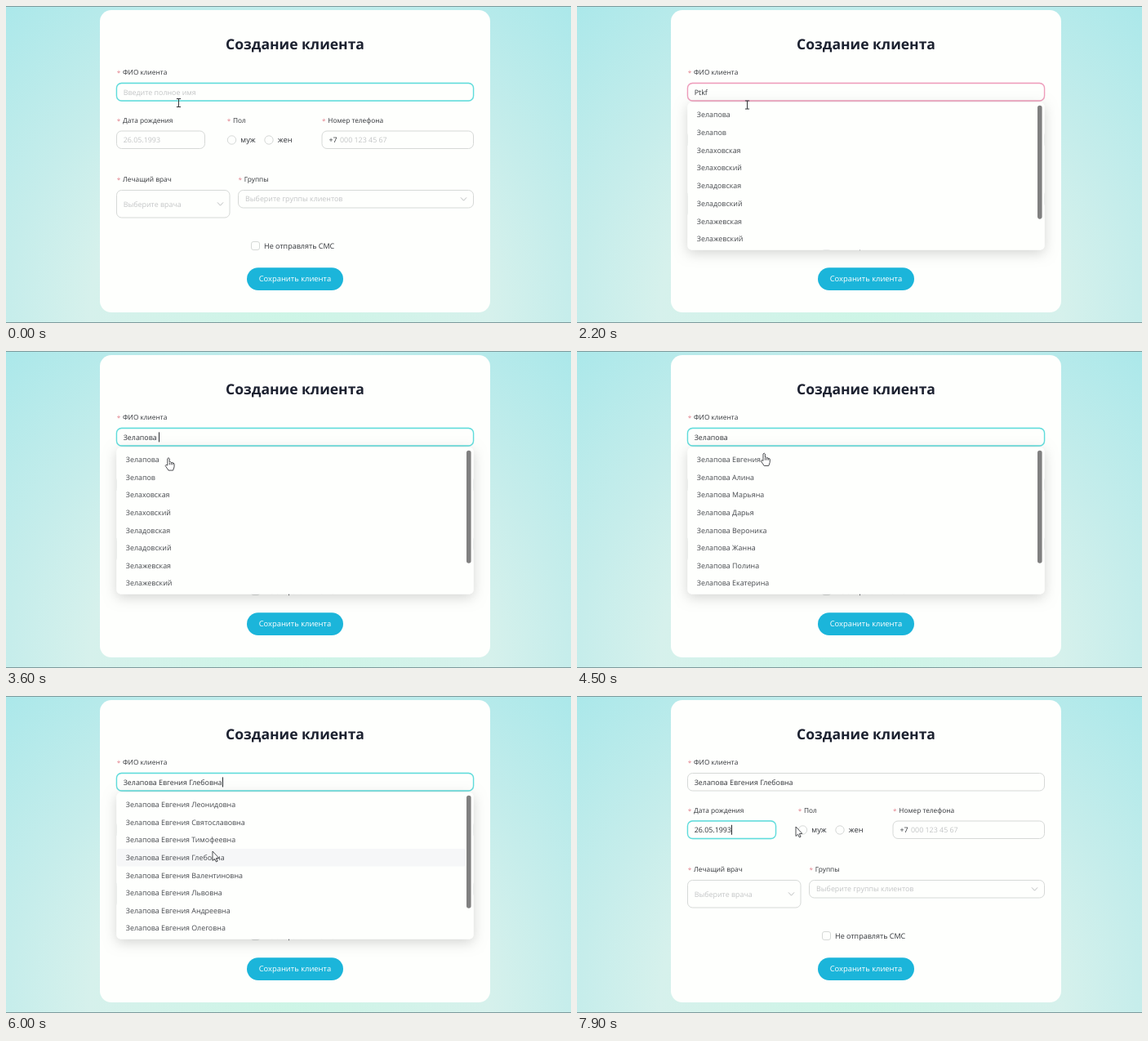
An HTML page with a canvas that plays this animation: 692 by 388 pixels, repeating every 8000 ms.

```html
<!DOCTYPE html>
<html lang="ru">
<head>
<meta charset="utf-8">
<title>Создание клиента</title>
<style>
html, body { margin: 0; width: 100%; height: 100%; overflow: hidden; }
canvas { display: block; width: 692px; height: 388px; }
</style>
</head>
<body>
<canvas id="stage" width="692" height="388"></canvas>
<script>
const ctx = document.getElementById('stage').getContext('2d');
const LOOP = 8000;
const FAMILY = '"Open Sans", "Noto Sans", sans-serif';
const INK = '#303338', HINT = '#c3c5c6', LINE = '#d6d9d7', CYAN = '#5fdcdb', PINK = '#ee9dbb';
const BODY = 8.9, LABEL = 8.3;

const SURNAME = 'Зелапова', FIRST = 'Евгения';
const firstNames = [FIRST, 'Алина', 'Марьяна', 'Дарья', 'Вероника', 'Жанна', 'Полина', 'Екатерина'];
const patronymics = ['Леонидовна', 'Святославовна', 'Тимофеевна', 'Глебовна',
  'Валентиновна', 'Львовна', 'Андреевна', 'Олеговна'];

// Each menu opens at `from` and starts closing at `to`.
const menus = [
  { from: 1850, to: 3600, items: [SURNAME, 'Зелапов', 'Зелаховская', 'Зелаховский',
    'Зеладовская', 'Зеладовский', 'Зелажевская', 'Зелажевский'] },
  { from: 4100, to: 4735, items: firstNames.map(n => `${SURNAME} ${n}`) },
  { from: 5200, to: 6050, hover: true, items: patronymics.map(p => `${SURNAME} ${FIRST} ${p}`) }
];

const typed = (text, start, step) =>
  [...text].map((_, i) => [start + i * step, text.slice(0, i + 1)]);

const nameEdits = [
  [300, ''],
  ...typed('Ptkf', 1300, 120),
  [3500, SURNAME + ' '],
  [4700, `${SURNAME} ${FIRST} `],
  [5900, `${SURNAME} ${FIRST} ${patronymics[3]}`]
];
const dateEdits = [[6600, ''], ...typed('26.05.1993', 7000, 75)];

// time, x, y, shape
const pointer = [
  [0, 211.5, 118.5, 'beam'], [1300, 211.5, 118.5, 'beam'], [1500, 208.5, 121, 'beam'],
  [2500, 208.5, 121, 'beam'], [3000, 199, 130.5, 'hand'], [4250, 199, 130.5, 'hand'],
  [4600, 236.5, 123.5, 'hand'], [5250, 236.5, 123.5, 'hand'], [5650, 253, 190, 'arrow'],
  [6150, 253, 190, 'arrow'], [6550, 214, 175, 'beam'], [7450, 214, 175, 'beam'],
  [7800, 268, 160, 'arrow'], [LOOP, 268, 160, 'arrow']
];

const clamp = v => Math.min(1, Math.max(0, v));
const smooth = v => v * v * (3 - 2 * v);
const latest = (list, t) => list.filter(e => e[0] <= t).pop() || list[0];

function text(str, x, midY, size = BODY, color = INK, align = 'left', weight = 400) {
  ctx.font = `${weight} ${size}px ${FAMILY}`;
  ctx.textAlign = align;
  ctx.fillStyle = color;
  ctx.fillText(str, x, midY + size * 0.355);
}

function box(x, y, w, h, r, fill, stroke, width = 1) {
  ctx.beginPath();
  ctx.roundRect(x, y, w, h, r);
  if (fill) { ctx.fillStyle = fill; ctx.fill(); }
  if (stroke) { ctx.strokeStyle = stroke; ctx.lineWidth = width; ctx.stroke(); }
}

function poly(points, close) {
  ctx.beginPath();
  points.forEach(([x, y]) => ctx.lineTo(x, y));
  if (close) ctx.closePath();
}

function label(str, x, y) {
  text('*', x, y + 0.8, LABEL, '#e2848f');
  text(str, x + 7.3, y, LABEL);
}

function field(x, y, w, h, accent) {
  if (accent) {
    ctx.globalAlpha = 0.28;
    box(x - 1, y - 1, w + 2, h + 2, 7, accent);
    ctx.globalAlpha = 1;
  }
  box(x, y, w, h, 6, '#fefffd', accent || LINE, accent ? 1.3 : 1);
}

function caret(x, midY, since, t) {
  if (Math.floor((t - since) / 530) % 2) return;
  ctx.fillStyle = '#26292e';
  ctx.fillRect(Math.round(x), midY - 6, 1, 12);
}

function edit(list, hint, x, midY, active, t) {
  const [since, value] = latest(list, t);
  text(value || hint, x, midY, BODY, value ? INK : HINT);
  if (active) caret(x + (value ? ctx.measureText(value).width : -0.4), midY, since, t);
}

function chevron(x, y) {
  poly([[x - 3.5, y - 1.8], [x, y + 2], [x + 3.5, y - 1.8]]);
  ctx.strokeStyle = '#bcbfbf';
  ctx.lineWidth = 1;
  ctx.stroke();
}

function radio(x, str) {
  ctx.beginPath();
  ctx.arc(x, 164, 5.2, 0, Math.PI * 2);
  ctx.strokeStyle = LINE;
  ctx.lineWidth = 1;
  ctx.stroke();
  text(str, x + 10.8, 164, 9.3);
}

function backdrop() {
  const g = ctx.createRadialGradient(346, 388, 0, 346, 388, 520);
  g.addColorStop(0, '#cdf5e6');
  g.addColorStop(0.47, '#d6f1ec');
  g.addColorStop(0.66, '#c6edeb');
  g.addColorStop(1, '#abe8ea');
  ctx.fillStyle = g;
  ctx.fillRect(0, 0, 692, 388);
  ctx.fillStyle = '#7d9a9c';
  ctx.fillRect(0, 0, 692, 1);
  ctx.fillRect(0, 387, 692, 1);
  box(115, 5, 478, 370, 14, '#fefffd');
}

function form(t) {
  const onDate = t >= 6600;
  const nameAccent = onDate ? null : t >= 1300 && t < 3500 ? PINK : CYAN;

  text('Создание клиента', 354, 47.2, 17.5, '#1c2130', 'center', 700);

  label('ФИО клиента', 135.7, 81.2);
  field(135.5, 94.5, 437, 21.5, nameAccent);
  edit(nameEdits, 'Введите полное имя', 143.7, 105.4, !onDate, t);

  label('Дата рождения', 135.7, 140);
  field(135.5, 153, 108, 21.5, onDate && CYAN);
  edit(dateEdits, '26.05.1993', 143.7, 163.8, onDate, t);

  label('Пол', 270.7, 140);
  radio(276.5, 'муж');
  radio(322, 'жен');

  label('Номер телефона', 387, 140);
  field(387, 153, 185.5, 21.5);
  text('+7', 395.5, 163.8);
  text('000 123 45 67', 409, 163.8, BODY, HINT);

  label('Лечащий врач', 135.7, 212);
  field(135.5, 225.5, 138.5, 33.5);
  text('Выберите врача', 143.7, 242.4, BODY, HINT);
  chevron(262.5, 242.2);

  label('Группы', 284.5, 212);
  field(284.5, 225.5, 288, 21.5);
  text('Выберите группы клиентов', 293, 236.2, BODY, HINT);
  chevron(560.5, 236.2);

  box(300.5, 288.5, 10, 10, 2.5, null, LINE);
  text('Не отправлять СМС', 316, 293.5, 9);

  box(295, 320.2, 118, 27.8, 13.9, '#1bb5da');
  text('Сохранить клиента', 353.9, 334, 9.4, '#fff', 'center');
}

// Shadow only outside the panel, so a fading panel stays clean.
function panelShadow(x, y, w, h) {
  ctx.save();
  ctx.beginPath();
  ctx.rect(x - 40, y - 40, w + 80, h + 80);
  ctx.roundRect(x, y, w, h, 5);
  ctx.clip('evenodd');
  ctx.shadowColor = 'rgba(0,0,0,0.17)';
  ctx.shadowBlur = 15;
  ctx.shadowOffsetY = 4;
  box(x, y, w, h, 5, '#fefffd');
  ctx.restore();
}

function menu(m, t, pos) {
  if (t < m.from || t > m.to + 200) return;
  const gone = t < m.to
    ? (1 - clamp((t - m.from) / 200)) ** 5
    : clamp((t - m.to) / 200) ** 5;
  const stretch = m === menus[0] && t < 3500 ? 1.006 : 1;

  ctx.save();
  ctx.globalAlpha = (1 - gone) ** 1.6;
  ctx.translate(0, 118);
  ctx.scale(1, (1 - 0.2 * gone) * stretch);

  panelShadow(135.5, 0, 437, 179.5);
  box(135.5, 0, 437, 179.5, 5, '#fefffd');

  if (m.hover) {
    const row = Math.round((pos.y - 132.8) / 21.64);
    if (row >= 0) box(136, 4 + row * 21.64, 427, 21.6, 2, '#f6f7f8');
  }
  m.items.forEach((item, i) => text(item, 146.8, 14.8 + i * 21.64, BODY, '#46494e'));
  box(564, 3.8, 5.6, 138, 2.8, '#808080');
  ctx.restore();
}

function pointerAt(t) {
  const i = pointer.findIndex(k => k[0] > t);
  const [t0, x0, y0, from] = pointer[i - 1], [t1, x1, y1, to] = pointer[i];
  const p = (t - t0) / (t1 - t0), e = smooth(p);
  return { x: x0 + (x1 - x0) * e, y: y0 + (y1 - y0) * e, shape: p < 0.6 ? from : to };
}

const shapes = {
  beam() {
    ctx.strokeStyle = '#34373a';
    ctx.lineWidth = 1;
    ctx.beginPath();
    for (const s of [-1, 1]) {
      ctx.moveTo(-2.6, 5 * s);
      ctx.lineTo(2.6, 5 * s);
    }
    ctx.moveTo(0, -5);
    ctx.lineTo(0, 5);
    ctx.stroke();
  },
  arrow() {
    poly([[0, 0], [0, 11.5], [2.6, 9.2], [4.4, 13], [6.1, 12.2], [4.4, 8.6], [7.8, 8.4]], true);
    paintCursor();
  },
  hand() {
    ctx.beginPath();
    ctx.moveTo(-1.2, 9.5);
    ctx.lineTo(-1.2, 1.2);
    ctx.quadraticCurveTo(0, -0.8, 1.2, 1.2);
    ctx.lineTo(1.2, 5.4);
    ctx.quadraticCurveTo(2.6, 4.6, 3.5, 6);
    ctx.quadraticCurveTo(5, 5.4, 5.6, 6.8);
    ctx.quadraticCurveTo(7, 6.4, 7.2, 8);
    ctx.lineTo(7, 11.5);
    ctx.lineTo(5.6, 15.6);
    ctx.lineTo(0, 15.6);
    ctx.lineTo(-3.8, 10);
    ctx.quadraticCurveTo(-3.4, 7.8, -1.2, 9.5);
    ctx.closePath();
    paintCursor();
    ctx.beginPath();
    for (const x of [1.3, 3.4, 5.4]) {
      ctx.moveTo(x, 6.2);
      ctx.lineTo(x, 8.8);
    }
    ctx.stroke();
  }
};

function paintCursor() {
  ctx.fillStyle = '#fff';
  ctx.fill();
  ctx.strokeStyle = '#3a3d40';
  ctx.lineWidth = 0.9;
  ctx.lineJoin = 'round';
  ctx.stroke();
}

function draw(t) {
  const pos = pointerAt(t);
  backdrop();
  form(t);
  menus.forEach(m => menu(m, t, pos));
  ctx.save();
  ctx.translate(pos.x, pos.y);
  shapes[pos.shape]();
  ctx.restore();
}

ctx.textRendering = 'geometricPrecision';
const start = performance.now();
function tick() {
  draw((performance.now() - start) % LOOP);
  requestAnimationFrame(tick);
}
tick();
</script>
</body>
</html>
```
